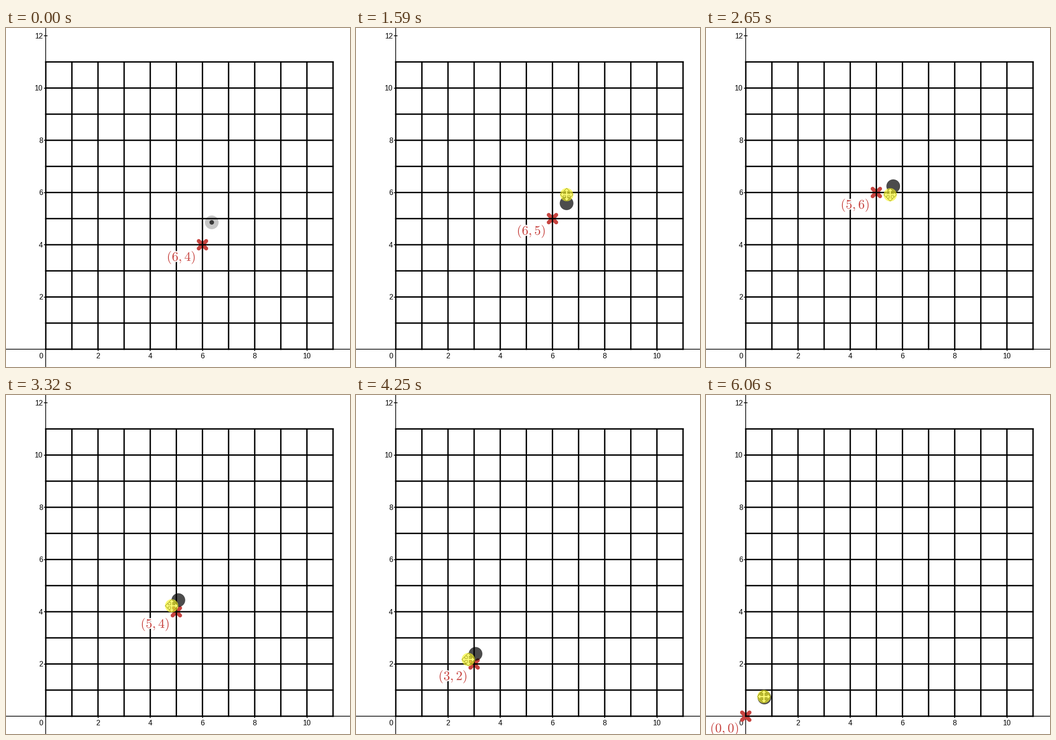
A matplotlib script that plays this animation: 754x743 px, repeating every 6.35 s.

```python
import math

import numpy as np
import matplotlib.pyplot as plt
import matplotlib.patheffects as pe
from matplotlib.animation import FuncAnimation
from matplotlib.collections import LineCollection
from matplotlib.patches import Circle, Polygon

W, H = 754, 743
DPI = 100
PX = 72 / DPI              # points per pixel
LOOP, STEP = 6350, 50      # ms
X0, Y0, UNIT, CELLS = 87.2, 704.0, 57.24, 11
RED = "#c74440"
GRAB = 700                 # the point turns solid from here on
LAG = 100                  # the point trails the cursor by this long

ENTRY = np.array([515, 764])
HOME = np.array([451, 426])
GRIP = np.array([1, 2])    # point centre relative to a resting cursor

# cursor strokes: start, end, resting place; the first only reaches the point
STROKES = [
    (100, 750, 442, 420), (750, 1400, 460, 390), (1410, 1790, 464, 335),
    (1990, 2390, 411, 339), (2520, 3150, 383, 441), (3150, 3830, 311, 517),
    (3850, 4490, 221, 604), (4500, 4910, 188, 618), (5020, 5560, 159, 648),
    (5650, 6050, 127, 661),
]


def progress(t, start, end):
    return min(max((t - start) / (end - start), 0), 1)


def pose(t):
    """Cursor and point centres: the cursor eases out, the point follows evenly."""
    cursor, point = ENTRY, HOME
    for k, (start, end, x, y) in enumerate(STROKES):
        rest = np.array([x, y])
        cursor = cursor + (rest - cursor) * (1 - (1 - progress(t, start, end)) ** 1.3)
        if k:
            point = point + (rest + GRIP - point) * progress(t, start + LAG, end)
        if t < end:
            break
    return cursor, point


def gx(n):
    return X0 + UNIT * n


def gy(n):
    return Y0 - UNIT * n


def lines(segs, width, color="black", z=1, **kw):
    ax.add_collection(LineCollection(segs, linewidths=width * PX, colors=color,
                                     zorder=z, **kw))


def disc(radius, color, alpha, z):
    return ax.add_patch(Circle((0, 0), radius, fc=color, ec="none",
                               alpha=alpha, zorder=z))


def number(x, y, n, ha):
    ax.text(x, y, str(n), ha=ha, va="center_baseline", fontsize=16 * PX,
            family="Liberation Sans", zorder=1)


fig = plt.figure(figsize=(W / 100, H / 100), dpi=DPI, facecolor="white")
ax = fig.add_axes([0, 0, 1, 1])
ax.set_xlim(0, W)
ax.set_ylim(H, 0)
ax.axis("off")

# axes, ticks and numbers
lines([[(0, Y0), (W, Y0)], [(X0, 0), (X0, H)]], 1.6)
evens = range(2, CELLS + 2, 2)
lines([[(X0 - 4, gy(n)), (X0 + 4, gy(n))] for n in evens], 1.6)
lines([[(gx(n), Y0 - 4), (gx(n), Y0 + 4)] for n in evens if n < CELLS], 1.6)
for n in evens:
    number(81, gy(n) - 0.2, n, "right")
    if n < CELLS:
        number(gx(n), 718, n, "center")
number(81, 718, 0, "right")
lines([[(0, H - 0.5), (W, H - 0.5)]], 1, "#c8c8c8", linestyles=[(0, (5, 4))])

# grid
ends = range(CELLS + 1)
lines([[(gx(n), gy(0)), (gx(n), gy(CELLS))] for n in ends]
      + [[(gx(0), gy(n)), (gx(CELLS), gy(n))] for n in ends],
      3, z=3, capstyle="projecting", snap=False)

# snapped cross and its label
cross = [ax.plot([], [], color=RED, lw=8.6 * PX, solid_capstyle="round", zorder=2)[0]
         for _ in range(2)]
label = ax.text(0, 0, "", color=RED, fontsize=28.7 * PX, math_fontfamily="cm",
                ha="center", va="center", zorder=4)
label.set_path_effects([pe.Stroke(linewidth=5 * PX, foreground="white"),
                        pe.Normal()])

# draggable point
halo = disc(15, "black", 0.22, 5)
dot = disc(5, "black", 0.7, 6)

# four-way cursor under a yellow highlight
arm = np.array([(-2, -2), (-2, -7.5), (-6.5, -7.5), (0, -14),
                (6.5, -7.5), (2, -7.5)])
quarter = np.array([(0, 1), (-1, 0)])
ARROWS = np.vstack([arm @ np.linalg.matrix_power(quarter, k) for k in range(4)])
arrows = ax.add_patch(Polygon(ARROWS, closed=True, fc="white", ec="black",
                              lw=1 * PX, zorder=7))
glow = disc(14.5, "#f8f628", 0.65, 8)


def draw(i):
    t = i * STEP
    c, p = pose(t)

    col = math.floor((p[0] - X0) / UNIT)
    row = math.floor((Y0 - p[1]) / UNIT)
    x, y, r = gx(col), gy(row), 8.2
    cross[0].set_data([x - r, x + r], [y - r, y + r])
    cross[1].set_data([x - r, x + r], [y + r, y - r])
    label.set_text(f"$({col},{row})$")
    label.set_position((x - 46.7, y + 27.7))

    held = t >= GRAB
    halo.center = dot.center = p
    halo.set_visible(not held)
    dot.set_radius(15 if held else 5)

    arrows.set_xy(ARROWS + c)
    glow.center = c
    return [*cross, label, halo, dot, arrows, glow]


anim = FuncAnimation(fig, draw, frames=LOOP // STEP, interval=STEP,
                     repeat=True, repeat_delay=0)
plt.show()
```
